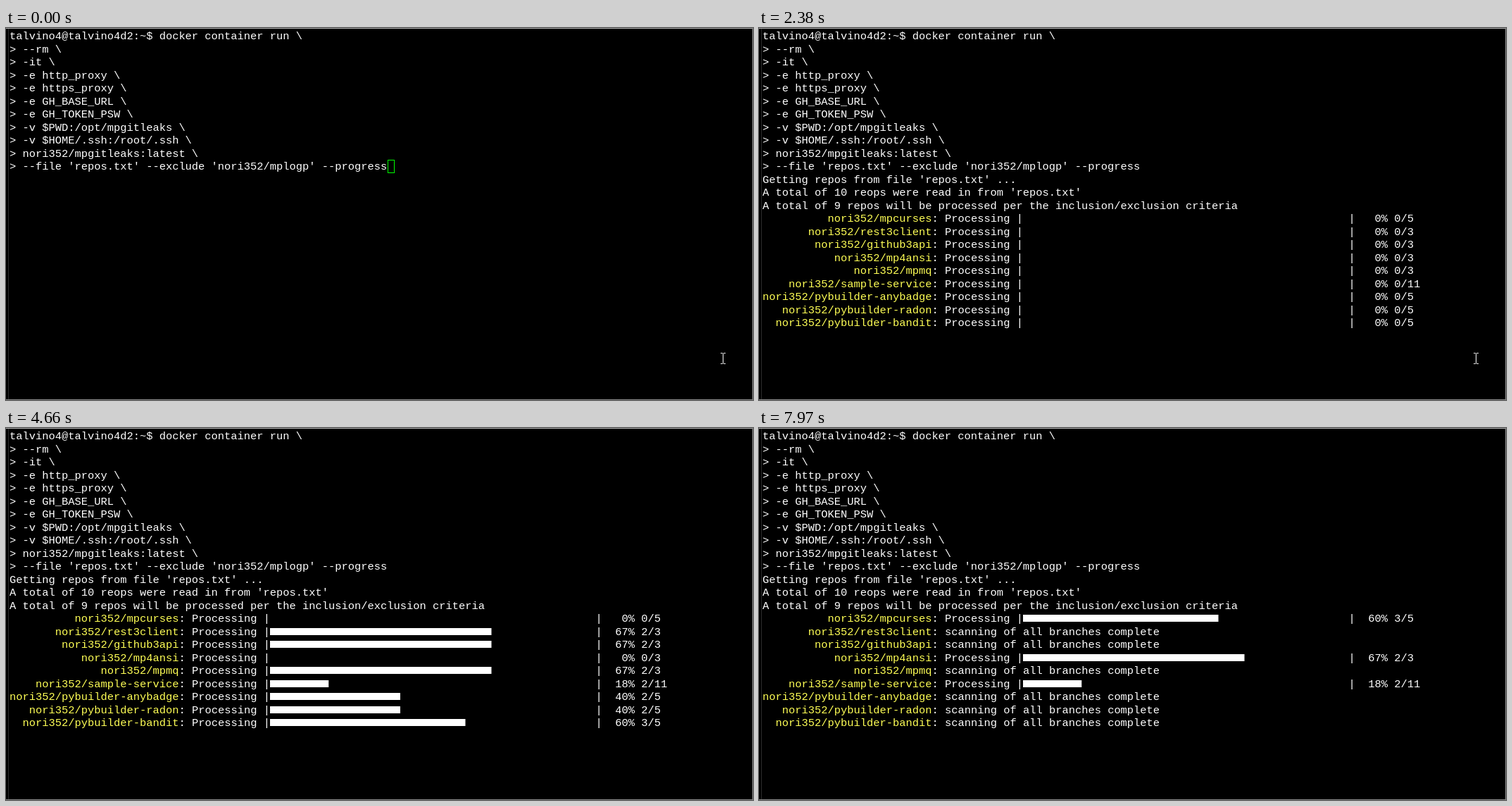
Write an HTML page with a canvas that moves like this. It is 1061 px wide and 528 px high and loops after 8000 ms.

```html
<!DOCTYPE html>
<html lang="en">
<head>
<meta charset="utf-8">
<title>Container scan</title>
<style>
  html, body { margin: 0; width: 100%; height: 100%; overflow: hidden; background: #000; }
  canvas { display: block; }
</style>
</head>
<body>
<canvas id="stage" width="1061" height="528"></canvas>
<script>
const ctx = document.getElementById('stage').getContext('2d');
const LOOP = 8000;
const CELL = 9.25, LINE = 18.52, LEFT = 5, BASELINE = 16, CELL_TOP = 2;
const WHITE = '#fff', YELLOW = '#ffff55', GREEN = '#00ff00';
const OWNER = 'nori352';
const BAR_COL = 40, BAR_CELLS = 50, NAME_WIDTH = 26;

const command = [
  'talvino4@talvino4d2:~$ docker container run \\',
  '> --rm \\',
  '> -it \\',
  '> -e http_proxy \\',
  '> -e https_proxy \\',
  '> -e GH_BASE_URL \\',
  '> -e GH_TOKEN_PSW \\',
  '> -v $PWD:/opt/mpgitleaks \\',
  '> -v $HOME/.ssh:/root/.ssh \\',
  `> ${OWNER}/mpgitleaks:latest \\`,
  `> --file 'repos.txt' --exclude '${OWNER}/mplogp' --progress`
];
const summary = [
  "Getting repos from file 'repos.txt' ...",
  "A total of 10 reops were read in from 'repos.txt'",
  'A total of 9 repos will be processed per the inclusion/exclusion criteria'
];

// steps: times at which each branch finishes; done: time the bar is replaced
const repos = [
  { name: 'mpcurses', total: 5, steps: [7550, 7790, 7970] },
  { name: 'rest3client', total: 3, steps: [4110, 4290], done: 6810 },
  { name: 'github3api', total: 3, steps: [3990, 4230], done: 5820 },
  { name: 'mp4ansi', total: 3, steps: [7550, 7600] },
  { name: 'mpmq', total: 3, steps: [3870, 3930], done: 4960 },
  { name: 'sample-service', total: 11, steps: [4350, 4410] },
  { name: 'pybuilder-anybadge', total: 5, steps: [4170, 4350, 6060, 6060], done: 7240 },
  { name: 'pybuilder-radon', total: 5, steps: [3930, 3990, 4720, 4770], done: 6060 },
  { name: 'pybuilder-bandit', total: 5, steps: [3870, 3930, 4660, 4720], done: 5700 }
];

// time, x, y of the mouse pointer
const pointerPath = [
  [0, 1018, 469], [3630, 1015, 469], [3690, 1009, 469],
  [3870, 1000, 468], [3930, 980, 465], [3990, 955, 463]
];
const POINTER_HIDDEN = 4110;

const colX = col => LEFT + col * CELL;
const rowY = row => BASELINE + row * LINE;

function rect(x, y, w, h, color) {
  ctx.fillStyle = color;
  ctx.fillRect(x, y, w, h);
}

function write(text, row, col = 0, color = WHITE) {
  ctx.fillStyle = color;
  ctx.fillText(text, colX(col), rowY(row));
}

function drawCursor(t) {
  if (t >= 1770) return;
  const [row, col] = t < 710 ? [10, 58] : [11, 0];
  const x = Math.round(colX(col)), y = Math.round(CELL_TOP + row * LINE);
  if (t >= 370) return rect(x, y, 10, 19, GREEN);
  ctx.strokeStyle = GREEN;
  ctx.lineWidth = 1;
  ctx.strokeRect(x + 0.5, y + 0.5, 9, 18);
}

function drawRepo({ name, total, steps, done }, index, t) {
  const row = command.length + summary.length + index;
  if (t < (index < 5 ? 1830 : 1890)) return;
  const label = `${OWNER}/${name}`;
  write(label, row, NAME_WIDTH - label.length, YELLOW);
  write(':', row, NAME_WIDTH);

  if (t < 2260 + 60 * Math.floor(index / 3)) return;
  if (t >= done) return write('scanning of all branches complete', row, 28);

  const count = steps.filter(time => t >= time).length;
  const percent = Math.round(100 * count / total);
  // half cells go to the even neighbour
  const half = Math.floor(percent / 2);
  const cells = percent % 2 ? half + half % 2 : half;
  write('Processing |', row, 28);
  rect(colX(BAR_COL), Math.round(rowY(row)) - 10, cells * CELL, 10, WHITE);
  write(`|${String(percent).padStart(4)}% ${count}/${total}`, row, BAR_COL + BAR_CELLS);
}

function drawPointer(t) {
  if (t >= POINTER_HIDDEN) return;
  const [, x, y] = pointerPath.findLast(([time]) => t >= time);
  rect(x, y - 7, 1, 14, WHITE);
  for (const end of [y - 8, y + 7]) {
    rect(x - 3, end, 3, 1, WHITE);
    rect(x + 1, end, 3, 1, WHITE);
  }
}

function drawBorder() {
  rect(3, 0, 1, 528, '#2c2c2c');
  rect(0, 0, 1061, 1, '#b0b0b0');
  rect(1060, 0, 1, 528, '#888');
  rect(0, 527, 1061, 1, '#888');
}

function draw() {
  const t = performance.now() % LOOP;
  rect(0, 0, 1061, 528, '#000');
  drawBorder();
  ctx.font = '15.41px "Liberation Mono", monospace';
  command.forEach((line, row) => write(line, row));
  if (t >= 1770) summary.forEach((line, i) => write(line, command.length + i));
  repos.forEach((repo, i) => drawRepo(repo, i, t));
  drawCursor(t);
  drawPointer(t);
  requestAnimationFrame(draw);
}
draw();
</script>
</body>
</html>
```
